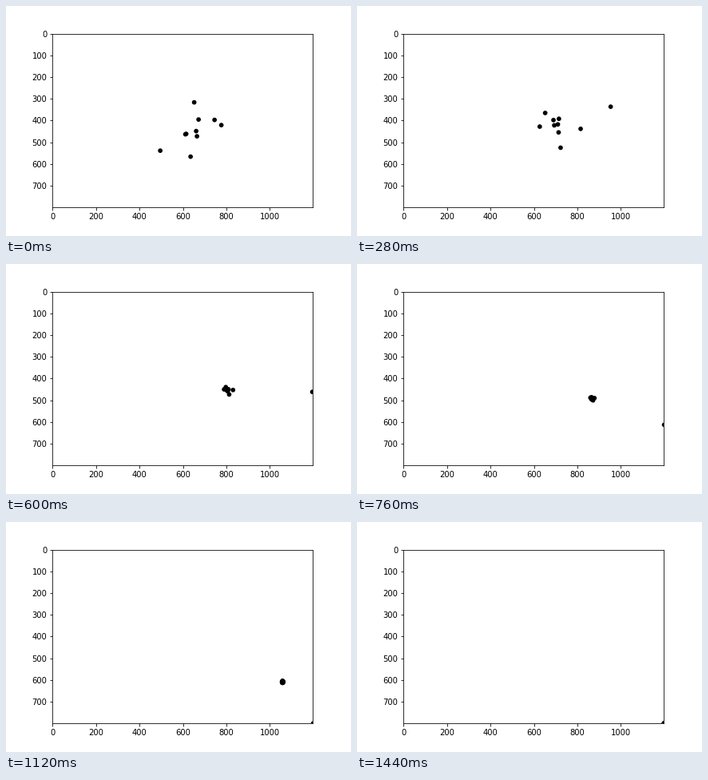
A matplotlib script that plays this animation: 432 by 288 pixels, repeating every 1520 ms.

```python
import numpy as np
import matplotlib.pyplot as plt
from matplotlib.animation import FuncAnimation
from matplotlib.patches import Circle

W, H, DPI = 432, 288, 72
FIELD_W, FIELD_H = 1200, 800
STEPS, INTERVAL = 38, 40
LAST_MOVE = 36
RADIUS = 10.5
LEFT, TOP, SCALE = 58.32, 34.56, 217.44 / 800  # field placement on the stage

plt.rcParams.update({"font.family": "DejaVu Sans", "font.size": 10})

# Initial state of the flock, in stage pixels and pixels per step
START = np.array([
    (235.5, 120.5), (241, 142), (238, 156.5), (224.5, 160.5), (225.5, 160),
    (239, 163), (261, 142.5), (193, 181), (231, 188.5)])
VELOCITY = np.array([
    (0, 1.9), (0.7, 0.1), (2.1, -2.2), (3.2, -1.6), (3.7, -1.7),
    (1.9, -0.7), (2.7, 1.6), (5.1, -4.3), (3.4, -1.6)])

# Path of the flock's centre
TIMES = np.array([0, 7, 11, 19, 25, 32, 36])
CENTRE = np.array([
    (232, 157), (249.8, 150.6), (263.2, 151), (294.3, 168.5),
    (325.5, 187), (379.7, 223.8), (420, 258)])
CENTRE_SLOPE = np.gradient(CENTRE, TIMES, axis=0, edge_order=2)

GATHER, DECAY = 7, 5.4  # steps of free flight, then time constant of closing in
angle = 2 * np.pi * np.arange(len(START)) / len(START)
HUDDLE = np.column_stack([0.9 * np.cos(angle), 1.4 * np.sin(angle)])


def centre(t):
    """Smooth Hermite path through CENTRE."""
    i = min(np.searchsorted(TIMES, t, side="right") - 1, len(TIMES) - 2)
    span = TIMES[i + 1] - TIMES[i]
    u = (t - TIMES[i]) / span
    ease = u * u * (3 - 2 * u)
    return (CENTRE[i] + ease * (CENTRE[i + 1] - CENTRE[i])
            + u * (1 - u)**2 * span * CENTRE_SLOPE[i]
            - u * u * (1 - u) * span * CENTRE_SLOPE[i + 1])


def flock(t):
    """Fly straight at first, then close in on the centre."""
    free = START + VELOCITY * min(t, GATHER)
    if t <= GATHER:
        return free
    spread = np.exp(-(t - GATHER) / DECAY)
    offset = free - centre(GATHER)
    return centre(t) + spread * offset + (1 - spread) * HUDDLE


def leader(t):
    """One dot thrown on a parabola."""
    return np.array([269.5 + 6.21 * t + 0.0925 * t**2,
                     149 - 6.81 * t + 0.503 * t**2])


def to_field(pos):
    """Stage pixels to field units, held inside the walls."""
    return np.clip((pos - (LEFT, TOP)) / SCALE, 0, (FIELD_W, FIELD_H))


fig = plt.figure(figsize=(W / DPI, H / DPI), dpi=DPI, facecolor="white")
ax = fig.add_axes([0.125, 0.125, 0.775, 0.755])
ax.set_aspect("equal")
ax.set_xlim(-0.5, FIELD_W - 0.5)
ax.set_ylim(FIELD_H - 0.5, -0.5)
ax.set_xticks(range(0, FIELD_W, 200))
ax.set_yticks(range(0, FIELD_H, 100))

dots = [ax.add_patch(Circle((0, 0), RADIUS, facecolor="black", linewidth=0))
        for _ in range(len(START) + 1)]


def update(step):
    t = min(step, LAST_MOVE)
    spots = to_field(np.vstack([leader(t), flock(t)]))
    for dot, spot in zip(dots, spots):
        dot.center = spot
    return dots


anim = FuncAnimation(fig, update, frames=STEPS, interval=INTERVAL,
                     repeat=True, repeat_delay=0)
plt.show()
```
